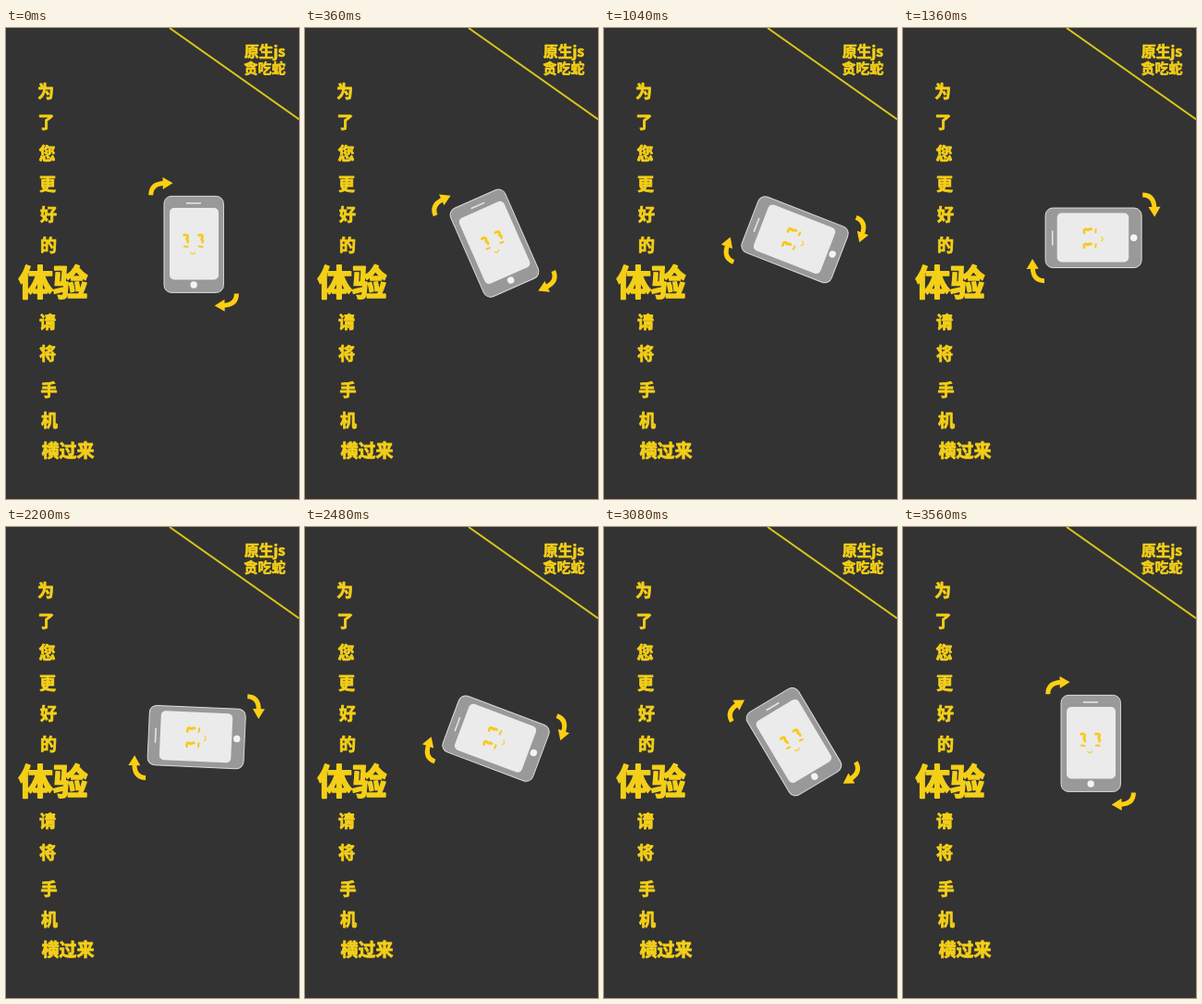
An HTML page that plays this animation: 317x508 px, repeating every 4440 ms.

```html
<!DOCTYPE html>
<html lang="zh">
<head>
<meta charset="utf-8">
<style>
html, body { margin: 0; width: 100%; height: 100%; overflow: hidden; background: #333; }
svg { display: block; width: 317px; height: 508px; }
text {
  font-family: "Noto Sans CJK SC", "Noto Sans CJK", sans-serif;
  font-weight: 900;
  text-anchor: middle;
  stroke: currentColor;
  stroke-linejoin: round;
}
</style>
</head>
<body>
<svg viewBox="0 0 317 508">
  <defs>
    <g id="arrow">
      <path d="M156.8 180.3Q156.8 168 171 167.6" fill="none" stroke="#fdcf13" stroke-width="5"/>
      <path d="M169.5 161L180.5 167.3L169.8 174Z" fill="#fdcf13"/>
    </g>
    <g id="eye" fill="none" stroke="#f9c81c" stroke-width="2.8" stroke-linecap="round">
      <path d="M192.6 223.4Q197 222.6 196.6 225.6Q196.4 227.2 194.6 227.4Q197.4 228 196.6 231"/>
      <path d="M192.9 235.6L196.6 236" stroke-width="2"/>
    </g>
  </defs>
  <path d="M177 0L317 98.5" stroke="#dcc51a" stroke-width="2"/>
  <g id="words" fill="currentColor" color="#f4cf18"></g>
  <g id="phone">
    <rect x="171" y="181.4" width="64.4" height="104" rx="8" fill="#999" stroke="#dcdcdc"/>
    <rect x="177" y="194" width="53" height="77.5" rx="5" fill="#ebebeb"/>
    <path d="M195 189H211" stroke="#e4e4e4" stroke-width="1.6"/>
    <circle cx="203.2" cy="277" r="3.7" fill="#f4f4f4"/>
    <use href="#eye"/>
    <use href="#eye" x="16"/>
    <path d="M199.2 241.6Q202 245.4 204.8 241.6" fill="none" stroke="#f3d23f" stroke-width="1.4"/>
    <use href="#arrow"/>
    <use href="#arrow" transform="rotate(180 203.1 233.4)"/>
  </g>
</svg>
<script>
// text, centre x, centre y, size
const words = [
  ['为', 43, 68], ['了', 43.5, 101.5], ['您', 44.5, 135], ['更', 45, 168],
  ['好', 46, 201], ['的', 46, 234], ['体验', 51, 274, 37.5],
  ['请', 45, 317], ['将', 45, 351], ['手', 46.5, 390], ['机', 47, 423],
  ['横过来', 67, 456, 19],
  ['原生js', 280, 24.7, 15.8], ['贪吃蛇', 280, 43.3, 15]
];
document.getElementById('words').innerHTML = words.map(([s, x, y, size = 18]) =>
  `<text x="${x}" y="${y + size * .375}" font-size="${size}" stroke-width="${size * .045}">${s}</text>`
).join('');

const phone = document.getElementById('phone');
const LOOP = 4440, STEP = 40;

function angle(t) {
  if (t < 2200) return -90 * Math.min(1, t / 1360);
  return -90 * Math.max(0, (3560 - t) / 1400);
}

function draw() {
  const t = Math.floor(performance.now() % LOOP / STEP) * STEP;
  phone.setAttribute('transform', `rotate(${angle(t)} 201.1 228.4)`);
  requestAnimationFrame(draw);
}
draw();
</script>
</body>
</html>
```
